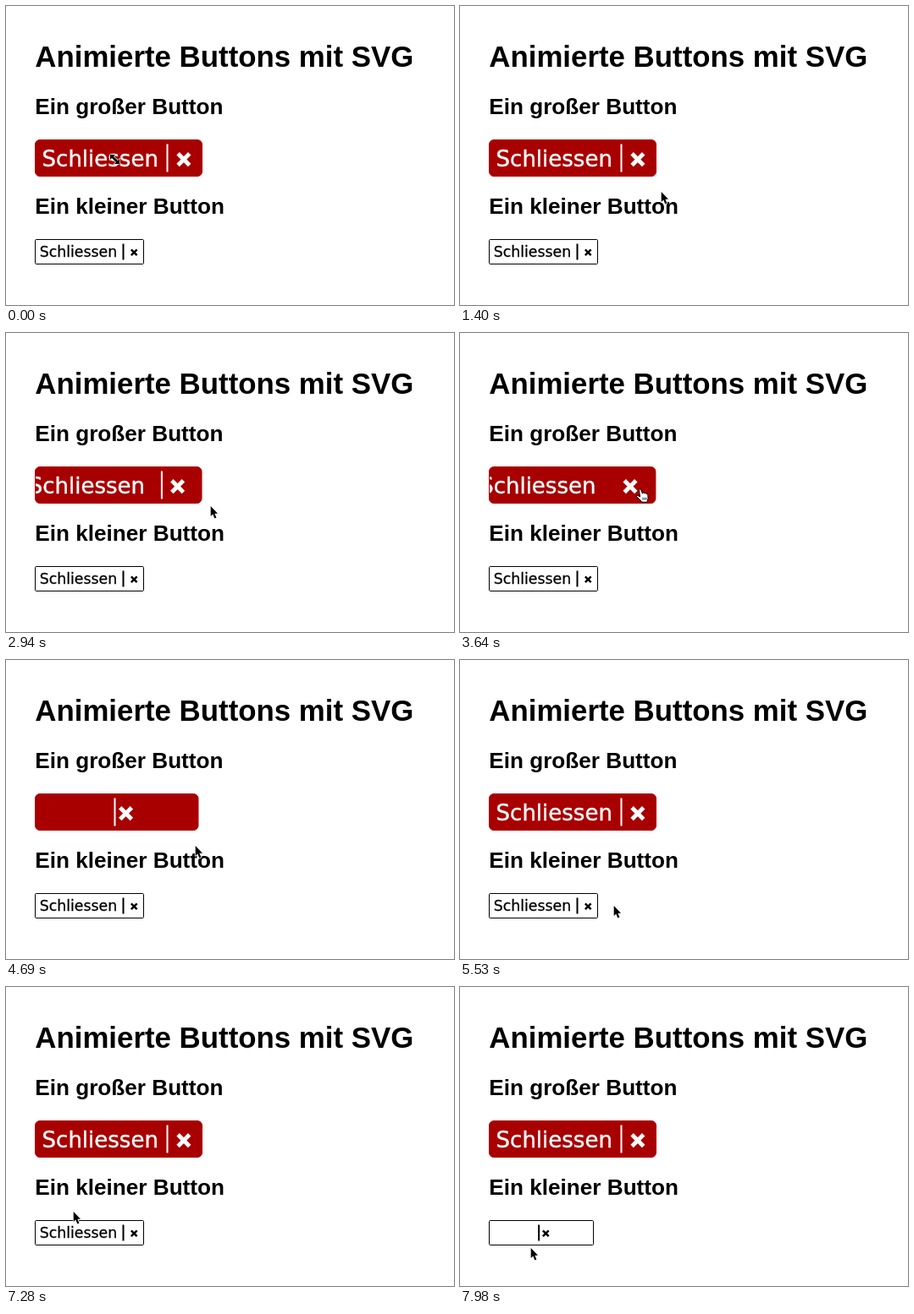
Animation of 529 by 354 pixels, one loop 8 s. Source, as an HTML page:

```html
<!DOCTYPE html>
<html lang="de">
<head>
<meta charset="utf-8">
<title>Animierte Buttons mit SVG</title>
<style>
  html, body { margin: 0; width: 100%; height: 100%; overflow: hidden; background: #fff; }
  svg { display: block; }
  .head { font-family: "Liberation Sans", Arial, sans-serif; font-weight: bold; }
  .label { font-family: "DejaVu Sans", Verdana, sans-serif; }
</style>
</head>
<body>
<svg width="529" height="354" viewBox="0 0 529 354">
  <g class="head">
    <text x="34.3" y="72" font-size="34.85">Animierte Buttons mit SVG</text>
    <text x="34.3" y="128" font-size="26.15">Ein großer Button</text>
    <text x="34.3" y="246" font-size="26.15">Ein kleiner Button</text>
  </g>
  <g id="buttons"></g>
  <g id="cursor">
    <path id="resize" d="M-6-6h6l-2 2 5 5 2-2v6h-6l2-2-5-5-2 2z"
      stroke="#fff" stroke-width="1.2" paint-order="stroke"/>
    <path id="arrow" d="M.7 1V13L3.3 10.6L5.3 15.4L7.4 14.5L5.4 9.8H9Z"
      stroke="#fff" stroke-width="1.6" paint-order="stroke" stroke-linejoin="round"/>
    <g id="hand" transform="translate(-4.5 -.8)" stroke="#000" stroke-linejoin="round">
      <path fill="#fff" d="M4 1.5Q4.5.3 6 1L8 6L8.3 4.9Q9.5 4.2 10.3 5.6Q11.5 4.7 12.4 6Q13.8 5.6 14.3 7.5L14.6 11.5L13.5 16H7.5L3.8 12L1 9.6Q.6 8 2.4 8.2L5 9.8Z"/>
      <path fill="none" stroke-width=".8" d="M8.5 10.5v3M10.5 10.5v3M12.4 10.5v3"/>
    </g>
  </g>
</svg>
<script>
const LOOP = 8000, STEP = 70, SLIDE = 350, LEFT = 34, SHRINK = 5;
const NS = "http://www.w3.org/2000/svg";
const byId = id => document.getElementById(id);

function add(parent, tag, attrs) {
  const el = document.createElementNS(NS, tag);
  for (const key in attrs) el.setAttribute(key, attrs[key]);
  return parent.appendChild(el);
}

// Contents are laid out for the big button and scaled by k.
function makeButton({ name, y, w, h, k, r, arm, fill, edge, ink, hovers }) {
  const root = byId("buttons");
  const box = { x: LEFT + .5, y: y + .5, width: w - 1, height: h - 1, rx: r };
  const frame = add(root, "rect", { ...box, fill });
  const mask = add(add(root, "clipPath", { id: name }), "rect", box);
  const inner = add(root, "g", { "clip-path": `url(#${name})`, fill: ink, stroke: ink });

  const text = add(inner, "text", {
    x: LEFT + 8.6 * k, y: y + 32.2 * k, "font-size": 26 * k, "stroke-width": .4 * k, class: "label"
  });
  text.textContent = "Schliessen";
  const bar = add(inner, "rect", {
    x: Math.floor(LEFT + 156 * k - .5) + .5, y: y + 5.5, width: 2, height: h - 11, stroke: "none"
  });
  const cross = add(inner, "path", {
    d: `M${-arm} ${-arm}L${arm} ${arm}M${arm} ${-arm}L${-arm} ${arm}`, "stroke-width": .72 * arm
  });
  const outline = add(root, "rect", { ...box, fill: "none", stroke: edge });

  const slide = (el, x, dy = 0) => el.setAttribute("transform", `translate(${x} ${dy})`);
  return {
    isHovered: t => hovers.some(([on, off]) => t >= on && t < off),
    draw(t) {
      const p = hovers.reduce(
        (sum, [on, off]) => sum + ease((t - on) / SLIDE) - ease((t - off) / SLIDE), 0);
      for (const el of [frame, mask, outline]) el.setAttribute("width", w - 1 - SHRINK * p);
      slide(text, -165 * k * p);
      slide(bar, -68.5 * k * p);
      slide(cross, LEFT + (175.9 - 75.5 * p) * k, y + 23.6 * k);
      bar.setAttribute("visibility", this.isHovered(t) ? "hidden" : "visible");
    }
  };
}

const buttons = [
  { name: "big", y: 158, w: 198, h: 44, k: 1, r: 5.5, arm: 6.8,
    fill: "#a80000", edge: "#a80000", ink: "#fff", hovers: [[1560, 2720], [3600, 4655]] },
  { name: "small", y: 276, w: 129, h: 30, k: 2 / 3, r: 1.2, arm: 3.4,
    fill: "#fff", edge: "#000", ink: "#000", hovers: [[5730, 6530], [7320, 7975]] }
].map(makeButton);

// CSS "ease": cubic-bezier(.25, .1, .25, 1)
function ease(x) {
  if (x <= 0) return 0;
  if (x >= 1) return 1;
  const curve = (u, a, b) => 3 * a * u * (1 - u) ** 2 + 3 * b * u * u * (1 - u) + u ** 3;
  let lo = 0, hi = 1;
  for (let i = 0; i < 24; i++) {
    const mid = (lo + hi) / 2;
    if (curve(mid, .25, .25) < x) lo = mid; else hi = mid;
  }
  return curve(lo, .1, 1);
}

// pointer stops: time, x, y
const stops = [
  [0, 126, 183], [280, 126, 184], [1050, 231, 236], [1400, 237, 219], [2030, 146, 186],
  [2380, 138, 185], [3220, 292, 213], [3640, 212, 185], [4410, 190, 184], [4690, 223, 219],
  [5180, 230, 290], [6020, 112, 289], [6300, 110, 289], [6580, 105, 266],
  [6930, 77, 241], [7840, 82, 303], [LOOP, 83, 309]
];

function pointerAt(t) {
  const i = stops.findIndex(stop => stop[0] > t);
  const [t0, x0, y0] = stops[i - 1], [t1, x1, y1] = stops[i];
  const k = (t - t0) / (t1 - t0);
  return [x0 + (x1 - x0) * k, y0 + (y1 - y0) * k];
}

function drawCursor(t) {
  const resizing = t < STEP;
  const kind = resizing ? "resize" : buttons.some(b => b.isHovered(t)) ? "hand" : "arrow";
  for (const id of ["resize", "arrow", "hand"])
    byId(id).setAttribute("visibility", id === kind ? "visible" : "hidden");
  const spot = resizing ? [129, 182] : pointerAt(t).map(Math.round);
  byId("cursor").setAttribute("transform", `translate(${spot})`);
}

const start = performance.now();
function draw() {
  const t = Math.floor((performance.now() - start) % LOOP / STEP) * STEP;
  buttons.forEach(button => button.draw(t));
  drawCursor(t);
  requestAnimationFrame(draw);
}
draw();
</script>
</body>
</html>
```
